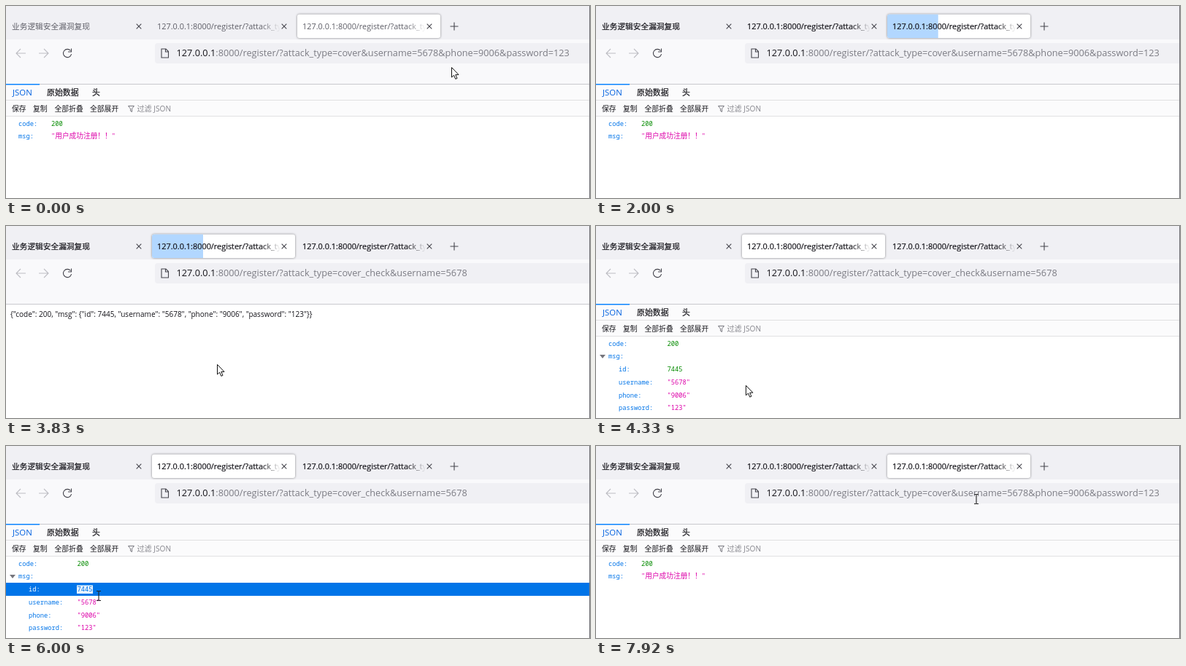
These frames come from a looping animation (800 by 264 pixels, 8 s). An HTML page:

```html
<!DOCTYPE html>
<html lang="zh-CN">
<head>
<meta charset="utf-8">
<title>JSON viewer</title>
<style>
html, body { margin: 0; width: 100%; height: 100%; overflow: hidden; background: #fff; }
svg { display: block; width: 100%; height: 100%; }
text { font: 10.9px "Open Sans", "Noto Sans CJK SC", "Noto Sans CJK", sans-serif; fill: #15141a; white-space: pre; }
.inactive text { fill: #5d5d66; }
#tabs:not(.inactive) text, .views text { stroke: #15141a; stroke-width: .22; }
.card { fill: none; }
.selected .card { fill: #fff; filter: drop-shadow(0 0 1.5px #0007); }
.hover:not(.selected) .card { fill: #d0d0d4; }
.burst { fill: #b2d7ff; }
.url text { font-size: 12.72px; fill: #7c7c84; }
.url .host { fill: #15141a; }
.bar { fill: #f0f0f4; }
.focus .bar { fill: #fff; stroke: #0a84ff; stroke-width: 2; }
.mark { fill: #0078d7; visibility: hidden; }
.focus .mark { visibility: inherit; }
.focus text, .focus .host { fill: #fff; }
.tools text { font-size: 9.8px; }
.tools .hint { font-size: 10.1px; fill: #85858c; }
.raw text { font-size: 10.02px; }
.tree text { font: 8.75px "Noto Sans Mono", "Noto Sans CJK SC", "Noto Sans CJK", monospace; }
.tree .key { fill: #0074e8; }
.tree .num { fill: #058b00; }
.tree .str { fill: #dd00a9; }
.zh { font-size: 9.7px; }
.row rect { fill: none; }
.picked rect { fill: #0074e8; }
.tree .picked text { fill: #fff; }
.line { fill: none; stroke: #45454d; stroke-width: 1.1; }
</style>
</head>
<body>
<svg viewBox="0 0 800 264">
  <defs>
    <linearGradient id="fade" gradientUnits="userSpaceOnUse" x1="150" x2="177" y1="0" y2="0">
      <stop stop-color="#fff"/><stop offset="1" stop-color="#000"/>
    </linearGradient>
    <mask id="titleMask" maskUnits="userSpaceOnUse" x="0" y="0" width="177" height="46">
      <rect width="177" height="46" fill="url(#fade)"/>
    </mask>
    <clipPath id="cardClip"><rect x="1" y="11.5" width="196" height="32.5" rx="3"/></clipPath>
    <path id="close" class="line" d="M178.7 24.7l6.6 6.6m0-6.6l-6.6 6.6"/>
  </defs>

  <rect width="800" height="264" fill="#fff"/>
  <rect width="800" height="46" fill="#f0f0f4"/>
  <rect y="46" width="800" height="61" fill="#f9f9fb"/>

  <g id="tabs">
    <g><text x="8" y="32" style="font-size:10.7px">业务逻辑安全漏洞复现</text><use href="#close"/></g>
  </g>
  <path class="line" d="M608.5 28h11m-5.5-5.5v11"/>

  <g class="line">
    <path stroke="#bdbdc3" d="M27 65H14m6-6l-6 6 6 6M45 65h13m-6-6l6 6-6 6"/>
    <path d="M88.5 61.5A5.6 5.6 0 1 0 89.6 66M89.5 58.5v4.5h-4.5"/>
  </g>
  <g id="url" class="url">
    <rect class="bar" x="204" y="51" width="620" height="28" rx="4"/>
    <path class="line" d="M213 59h6l3.5 3.5V71H213zM218.5 59v4h4"/>
    <rect class="mark" x="234" y="56" width="539" height="18"/>
    <text x="233.5" y="69"><tspan class="host">127.0.0.1</tspan><tspan id="path"></tspan></text>
  </g>
  <path d="M0 107.5h800" stroke="#c9c9ce"/>

  <g id="raw" class="raw"><text x="6" y="125"></text></g>

  <g id="viewer">
    <rect y="108" width="800" height="44" fill="#fbfbfc"/>
    <rect y="107" width="46" height="1.5" fill="#0a84ff"/>
    <path d="M0 129.5h800M0 151.5h800" stroke="#e0e0e2"/>
    <text x="9" y="123" style="font-size:11.4px;fill:#0060df">JSON</text>
    <g class="views"><text x="56" y="123">原始数据</text><text x="118" y="123">头</text></g>
    <g class="tools">
      <text x="8" y="144.5">保存</text><text x="37" y="144.5">复制</text>
      <text x="66.5" y="144.5">全部折叠</text><text x="115" y="144.5">全部展开</text>
      <path d="M167.5 137.5h8l-3 3.7v4.3l-2-1.2v-3.1z" fill="none" stroke="#77777f"/>
      <text class="hint" x="179.5" y="144.5">过滤 JSON</text>
    </g>
    <g id="flat" class="tree"></g>
    <g id="nested" class="tree">
      <path d="M5 177h8l-4 5z" fill="#75757c"/>
    </g>
  </g>
  <g id="textPick">
    <rect x="97" y="191.5" height="11.5" fill="#e6f1fd"/>
    <g class="tree"><text class="key" x="97.5" y="200.3">7445</text></g>
  </g>

  <path d="M799.5 0v264" stroke="#77777c"/>
  <g id="cursor">
    <path id="arrow" d="M.5 .5V14L3.6 11.2 5.8 16.4 8 15.4 5.8 10.4H10z" fill="#fff" stroke="#111" stroke-width="1"/>
    <path id="beam" d="M-3-6.5h2.2L0-6 .8-6.5H3M0-6V6M-3 6.5h2.2L0 6 .8 6.5H3" fill="none" stroke="#222" stroke-width="1.1"/>
  </g>
</svg>
<script>
const LOOP = 8000, FRAME = 250 / 3;
const USER = '5678', PHONE = '9006', PASS = '123';
const $ = id => document.getElementById(id);
const show = (el, on) => { el.style.visibility = on ? 'inherit' : 'hidden'; };
const between = (t, a, b) => t >= a && t < b;

const paths = {
  2: `:8000/register/?attack_type=cover_check&username=${USER}`,
  3: `:8000/register/?attack_type=cover&username=${USER}&phone=${PHONE}&password=${PASS}`
};
const rawText = {
  2: `{"code": 200, "msg": {"id": 7445, "username": "${USER}", "phone": "${PHONE}", "password": "${PASS}"}}`,
  3: '{"code": 200, "msg": "用户成功注册！！"}'
};

function addTab(x) {
  $('tabs').insertAdjacentHTML('beforeend', `<g transform="translate(${x})">
    <rect class="card" x="1" y="11.5" width="196" height="32.5" rx="3"/>
    <g clip-path="url(#cardClip)"><rect class="burst" x="1" y="11" height="34"/></g>
    <text x="8" y="32" mask="url(#titleMask)">127.0.0.1:8000/register/?attack_type=cover</text>
    <use href="#close"/></g>`);
  return $('tabs').lastElementChild;
}

function addRow(parent, index, keyX, key, valueX = 0, value = '', kind = '') {
  const top = 152.5 + index * 17.75;
  parent.insertAdjacentHTML('beforeend', `<g class="row">
    <rect y="${top}" width="799" height="18"/>
    <text class="key" x="${keyX}" y="${top + 12}">${key}:</text>
    <text class="${kind}" x="${valueX}" y="${top + 12}">${value}</text></g>`);
  return parent.lastElementChild;
}

const tabs = { 2: addTab(199), 3: addTab(398) };
addRow($('flat'), 0, 17, 'code', 62, 200, 'num');
addRow($('flat'), 1, 17, 'msg', 62, '"<tspan class="zh">用户成功注册！！</tspan>"', 'str');
const nested = $('nested');
addRow(nested, 0, 17, 'code', 97.5, 200, 'num');
addRow(nested, 1, 17, 'msg');
const idRow = addRow(nested, 2, 31, 'id', 97.5, 7445, 'num');
addRow(nested, 3, 31, 'username', 97.5, `"${USER}"`, 'str');
const phoneRow = addRow(nested, 4, 31, 'phone', 97.5, `"${PHONE}"`, 'str');
addRow(nested, 5, 31, 'password', 97.5, `"${PASS}"`, 'str');

// Pointer stops: time, x, y
const stops = [
  [0, 610, 84], [250, 644, 64], [500, 637, 84], [750, 637, 84], [1080, 622, 73],
  [2580, 622, 73], [2920, 310, 29], [3080, 310, 29], [3420, 289, 190], [3920, 289, 190],
  [4250, 206, 219], [4330, 206, 219], [4670, 95, 198], [4920, 95, 198], [5170, 140, 219],
  [5250, 140, 219], [5580, 97, 200], [6000, 127, 206], [6083, 127, 206], [6170, 172, 211],
  [6250, 172, 211], [6500, 150, 228], [6600, 150, 228], [7160, 484, 39], [7417, 484, 39],
  [7900, 521, 73], [LOOP, 521, 73]
];

function pointerAt(t) {
  const i = stops.findIndex(s => s[0] > t);
  const [t0, x0, y0] = stops[i - 1], [t1, x1, y1] = stops[i];
  const k = (t - t0) / (t1 - t0);
  return [x0 + (x1 - x0) * k, y0 + (y1 - y0) * k];
}

function drawBurst(tab, age) {
  const burst = tab.querySelector('.burst');
  burst.setAttribute('width', between(age, 0, 420) ? age * .84 : 0);
  burst.style.opacity = Math.min(1, (420 - age) / 220);
}

function draw(t) {
  const active = between(t, 2990, 7400) ? 2 : 3;
  const loading = between(t, 1820, 1990) || between(t, 3740, 3900);
  const [x, y] = pointerAt(t);
  const pointerShown = !between(t, 1820, 2660);

  $('tabs').classList.toggle('inactive', t < 1240);
  for (const n of [2, 3]) {
    const left = n === 2 ? 199 : 398;
    tabs[n].classList.toggle('selected', n === active);
    tabs[n].classList.toggle('hover', pointerShown && between(y, 11, 45) && between(x, left, left + 197));
  }
  drawBurst(tabs[3], t - 1917);
  drawBurst(tabs[2], t - 3750);

  $('url').classList.toggle('focus', between(t, 1240, 1820));
  $('path').textContent = paths[active];
  $('raw').firstChild.textContent = rawText[active];
  show($('raw'), loading);
  show($('viewer'), !loading);
  // Inline visibility cascades, so the trees also depend on the viewer
  show($('flat'), active === 3);
  show(nested, active === 2);
  idRow.classList.toggle('picked', between(t, 4900, 6570));
  phoneRow.classList.toggle('picked', t >= 6570);

  const picking = between(t, 5570, 6570);
  show($('textPick'), picking && (t > 6000 || x > 102));
  $('textPick').firstElementChild.setAttribute('width', t > 5900 ? 22 : Math.max(0, Math.min(22, x - 97)));

  const overText = x > 204 && between(y, 51, 80) || between(t, 5490, 6240);
  show($('cursor'), pointerShown);
  show($('arrow'), !overText);
  show($('beam'), overText);
  $('cursor').setAttribute('transform', `translate(${x.toFixed(1)} ${y.toFixed(1)})`);
}

const start = performance.now();
function tick() {
  const t = (performance.now() - start + 5) % LOOP;
  draw(Math.floor(t / FRAME) * FRAME);
  requestAnimationFrame(tick);
}
tick();
</script>
</body>
</html>
```
